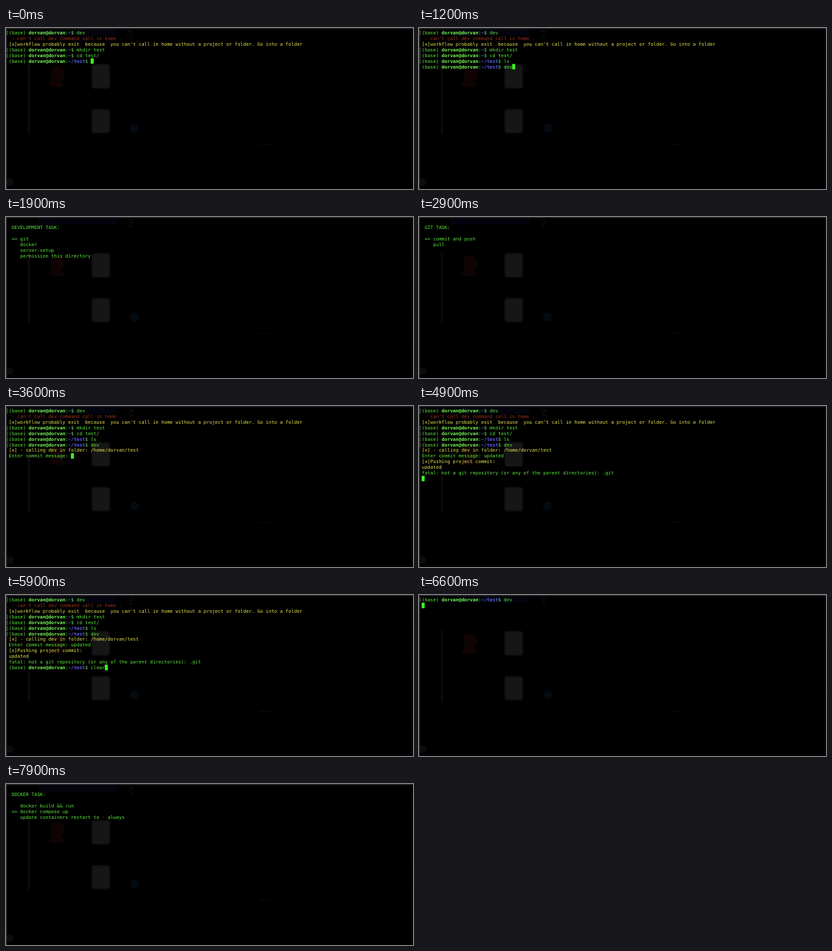
An HTML page for the animation above (8 s loop, 640 by 254 pixels).

```html
<!DOCTYPE html>
<html lang="en">
<head>
<meta charset="utf-8">
<title>Terminal session</title>
<style>
  html, body { margin: 0; width: 100%; height: 100%; overflow: hidden; background: #000; }
  svg { display: block; width: 640px; height: 254px; }
  text {
    font: 7.39px "DejaVu Sans Mono", monospace;
    text-rendering: geometricPrecision;
    white-space: pre;
    fill: #5ce63c;
  }
  .user { fill: #74f552; font-weight: bold; }
  .dir { fill: #5c58f0; font-weight: bold; }
  .note { fill: #e6e350; }
  .error { fill: #98301f; }
  .mark { fill: #7d8a78; }
</style>
</head>
<body>
<svg viewBox="0 0 640 254">
  <rect width="640" height="254" fill="#000"/>
  <!-- desktop faintly showing through the window -->
  <rect x="50" y="2" width="124" height="10" fill="#03040d"/>
  <path d="M189 5h10v4h-5M195 11v4h5" fill="none" stroke="#151515"/>
  <rect x="34.5" y="56" width="3" height="111" fill="#0d0d0d"/>
  <path d="M70 65q10-9 20 0l2 12-5 6 6 8-14 3-13-4 6-8z" fill="#100304"/>
  <g fill="#161616" stroke="#0d0d0d" stroke-width="2">
    <rect x="135" y="57.5" width="28" height="37.5" rx="4"/>
    <rect x="135" y="128.5" width="28" height="37" rx="4"/>
  </g>
  <circle cx="202" cy="158" r="7" fill="#030a10"/>
  <circle cx="6" cy="243" r="6" fill="#0c0c0c"/>
  <path d="M237 91h6m10 0h5m8 0h5m58 0h8M399 183.500h16" stroke="#0d0d0d"/>
  <path d="M264 125h36" stroke="#0d0304"/>
  <path d="M0 .7h640" stroke="#292929" stroke-width="1.4"/>
  <path d="M.7 0v254" stroke="#303030" stroke-width="1.4"/>
  <path d="M637.500 4v250" stroke="#101010" stroke-dasharray="2 2"/>
  <rect id="cursor" width="4.6" height="8.6" fill="#3dfa25"/>
  <g id="lines"></g>
</svg>
<script>
const LOOP = 8000, COL = 4.45, ROW = 8.9;
const user = 'dorvan';
const linesEl = document.getElementById('lines');
const cursor = document.getElementById('cursor');

const span = (cls, text) => `<tspan class="${cls}">${text}</tspan>`;
const typed = (text, t, start, step) =>
  text.slice(0, Math.max(0, Math.floor((t - start) / step) + 1));

// Every line begins one column left of the text, where the prompt mark sits.
const prompt = (dir, cmd = '', done = false) =>
  (done ? span('mark', '[') : ' ') + '(base) ' + span('user', `${user}@${user}`) +
  ':' + span('dir', dir) + '$ ' + cmd;

const menu = (title, items, chosen) => ({
  menu: true,
  lines: ['', `  ${title} TASK:`, '',
    ...items.map((item, i) => `  ${i === chosen ? '=>' : '  '} ${item}`)]
});

const mainMenu = chosen => menu('DEVELOPMENT',
  ['git', 'docker', 'server-setup', 'permission this directory'], chosen);
const gitMenu = () => menu('GIT', ['commit and push', 'pull'], 0);
const dockerMenu = chosen => menu('DOCKER',
  ['docker build &amp;&amp; run', 'docker compose up', 'update containers restart to - always'], chosen);

function history(t) {
  const lines = [
    prompt('~', 'dev', true),
    span('error', "  - can't call dev command call in home ."),
    span('note', " [x]workflow probably exit  because  you can't call in home without a project or folder. Go into a folder"),
    prompt('~', 'mkdir test', true),
    prompt('~', 'cd test/', true)
  ];
  if (t < 700) return [...lines, prompt('~/test', typed('ls', t, 300, 150))];
  lines.push(prompt('~/test', 'ls', true));
  if (t < 1500) return [...lines, prompt('~/test', typed('dev', t, 1000, 100))];
  lines.push(prompt('~/test', 'dev', true),
    span('note', ` [x] - calling dev in folder: /home/${user}/test`));
  if (t < 1900) return [...lines, ' '];
  lines.push(' Enter commit message: ' + typed('updated', t, 3900, 110));
  if (t < 4900) return lines;
  lines.push(span('note', ' [x]Pushing project commit:'), span('note', ' updated'),
    ' fatal: not a git repository (or any of the parent directories): .git');
  return [...lines, t < 5000 ? ' ' : prompt('~/test', typed('clear', t, 5300, 120))];
}

function screen(t) {
  if (t < 1900) return { lines: history(t) };
  if (t < 2500) return mainMenu(0);
  if (t < 3100) return gitMenu();
  if (t < 6100) return { lines: history(t) };
  if (t < 6500) return { lines: [prompt('~/test', t < 6300 ? '' : 'de')] };
  if (t < 6700) return { lines: [prompt('~/test', 'dev', true), ' '] };
  if (t < 7400) return mainMenu(t < 7100 ? 0 : 1);
  return dockerMenu(t < 7900 ? 0 : 1);
}

let shown;
function draw(now) {
  const { lines, menu } = screen(now % LOOP);
  const html = lines.map((line, i) =>
    `<text x="0.05" y="${(10.1 + i * ROW).toFixed(2)}">${line}</text>`).join('');
  if (html !== shown) {
    linesEl.innerHTML = shown = html;
    cursor.setAttribute('x', (linesEl.lastChild.textContent.length - 1) * COL + 4.2);
    cursor.setAttribute('y', (lines.length - 1) * ROW + 3.3);
    cursor.style.display = menu ? 'none' : '';
  }
}

const start = performance.now();
function tick() {
  draw(performance.now() - start);
  requestAnimationFrame(tick);
}
tick();
</script>
</body>
</html>
```
